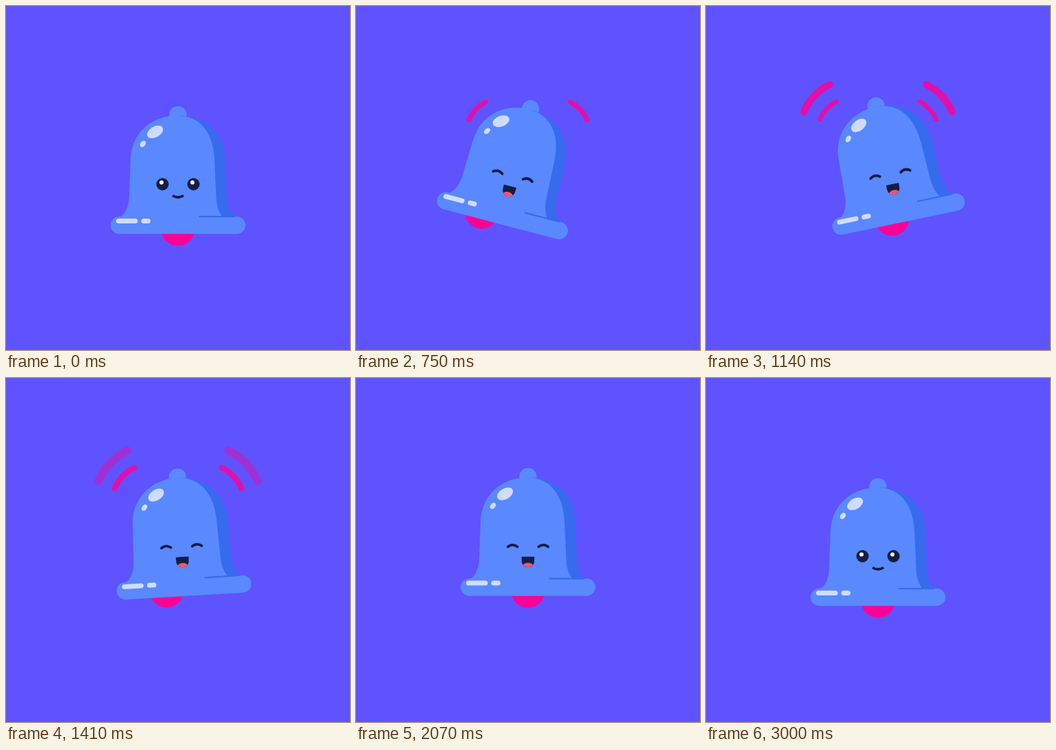
These frames come from a looping animation (500x500 px, 3630 ms). An HTML page:

```html
<!DOCTYPE html>
<html lang="en">
<head>
<meta charset="utf-8">
<title>Ringing bell</title>
<style>
  html, body { margin: 0; width: 100%; height: 100%; overflow: hidden; background: #5f52ff; }
  svg { display: block; width: 100%; height: 100%; }
  .bell { fill: #5a88ff; }
  .shade { fill: #376bee; }
  .shine { fill: #d0dcff; }
  .ink { fill: #141d45; }
  .line { fill: none; stroke: #141d45; stroke-width: 3.8; }
  .pink { fill: #ff0096; }
  .wave { fill: none; stroke: #ff0096; stroke-width: 11.3; stroke-linecap: round; }
</style>
</head>
<body>
<svg viewBox="0 0 500 500">
  <defs>
    <clipPath id="lips"><path d="M240.6 274H259.4L259 282Q257.5 289.5 250 289.5Q242.5 289.5 241 282Z"/></clipPath>
    <g id="eye">
      <circle class="ink" r="9"/>
      <circle r="3" cx="-1.5" cy="-2.6" fill="#fff"/>
    </g>
    <path id="arc" class="wave" d="M-71.6 -33.5Q-59 -62.7 -30.6 -77"/>
  </defs>

  <g id="waves"></g>

  <g id="bell">
    <circle id="clapper" class="pink" cx="250" cy="324" r="24.5"/>
    <circle class="bell" cx="250" cy="158" r="12.6"/>
    <path class="shade" d="M250 159C288 159 317 184 319 222L321 278C322 290 326 303 336 308H250Z"/>
    <path class="bell" d="M164 308C174 303 178.5 290 179 278L181 222C183 184 212 159 250 159C282 160 301 184 303 222L305.5 278C306 290 309 300 316 308Z"/>
    <rect class="bell" x="152" y="306" width="196" height="25.3" rx="12.6"/>
    <rect class="shade" x="280" y="305" width="53" height="2.2" rx="1.1"/>
    <g id="gloss">
      <ellipse class="shine" rx="12.5" ry="7.8" transform="translate(216.7 183) rotate(-30)"/>
      <ellipse class="shine" rx="5.2" ry="3.5" transform="translate(199 200.5) rotate(-52)"/>
    </g>
    <rect class="shine" x="160" y="309" width="31.5" height="7" rx="3.5"/>
    <rect class="shine" x="196.5" y="309" width="13.5" height="7" rx="3.5"/>

    <g id="open">
      <use href="#eye" x="227.5" y="259"/>
      <use href="#eye" x="272.5" y="259"/>
      <circle class="bell lid" cx="227.5" r="9.5"/>
      <circle class="bell lid" cx="272.5" r="9.5"/>
    </g>
    <path id="shut" class="line" stroke-linecap="round" d="M220.7 259.7Q227.6 254.6 234.5 259.7M265.5 259.7Q272.4 254.6 279.3 259.7"/>

    <path id="smile" class="line"/>
    <g id="laugh">
      <g clip-path="url(#lips)">
        <rect class="ink" x="238" y="272" width="24" height="20"/>
        <ellipse cx="250" cy="288.5" rx="8" ry="5.5" fill="#f0556e"/>
      </g>
    </g>
  </g>
</svg>
<script>
const LOOP = 3630;
const $ = id => document.getElementById(id);
const clamp = x => Math.min(1, Math.max(0, x));
const part = (t, from, to) => clamp((t - from) / (to - from));
const ease = (t, from, to) => (1 - Math.cos(Math.PI * part(t, from, to))) / 2;
const bump = (t, from, to) => Math.sin(Math.PI * part(t, from, to)) ** 2;

// Damped swing with a 300 ms period, in degrees.
const swing = t => 19.4 * ease(t, 570, 720) * (1 - part(t, 570, 1970) ** 1.5)
  * Math.cos(Math.PI * (t - 720) / 150);

// The bell ducks, floats up, then drops and bounces once.
const duck = t => bump(t, 420, 660);
const land = t => bump(t, 2140, 2510);
const float = t => (1 - Math.exp(-Math.max(0, t - 463) / 300)) * (1 - ease(t, 2100, 2300));
const lift = t => 17 * duck(t) + 9.5 * land(t) - 14.6 * float(t);
const squash = t => 0.04 * duck(t) + 0.025 * land(t);

// The clapper swings wider and slightly slower than the bell, then wobbles out.
const wobble = t => 2.3 * Math.sin(Math.PI * Math.max(0, t - 2180) / 165) * (1 - ease(t, 2180, 2960));
const clapper = t => 1.46 * swing(t * 0.975) - swing(t) + wobble(t);

const closed = t => ease(t, 430, 590) - ease(t, 2250, 2480);
const mouth = t => ease(t, 480, 620) - ease(t, 2200, 2370);
const grin = t => 1 - ease(t, 420, 500) + ease(t, 2430, 2580);

// Sound waves, mirrored left and right.
const WAVES = 5, FIRST = 655, GAP = 202.5, LIFE = 395;
const waves = Array.from({ length: WAVES * 2 }, () => {
  const use = document.createElementNS("http://www.w3.org/2000/svg", "use");
  use.setAttribute("href", "#arc");
  return $("waves").appendChild(use);
});
const lids = document.querySelectorAll(".lid");

function set(el, attrs) {
  for (const name in attrs) el.setAttribute(name, attrs[name]);
}
const show = (el, on) => set(el, { visibility: on ? "visible" : "hidden" });

function drawBell(t) {
  const angle = swing(t), k = squash(t);
  set($("bell"), {
    transform: `translate(0 ${lift(t)}) rotate(${angle} 250 172) ` +
      `translate(250 331) scale(${1 + k} ${1 - 1.35 * k}) translate(-250 -331)`
  });
  set($("clapper"), { transform: `rotate(${clapper(t)} 250 172)` });
  set($("gloss"), { transform: `rotate(${-0.36 * angle} 250 222)` });
}

function drawFace(t) {
  const c = closed(t), m = mouth(t), g = grin(t);
  show($("open"), c < 0.85);
  show($("shut"), c >= 0.85);
  lids.forEach(lid => set(lid, { cy: 278 - 15 * c }));
  show($("laugh"), m > 0.2);
  show($("smile"), m <= 0.2);
  set($("laugh"), { transform: `translate(0 277) scale(1 ${m}) translate(0 -277)` });
  set($("smile"), { d: `M242 ${277 - 1.5 * g}Q250 ${277 + 3.5 * g} 258 ${277 - 1.5 * g}` });
}

function drawWaves(t) {
  const y = 191 + lift(t) / 2;
  waves.forEach((wave, i) => {
    const p = (t - FIRST - GAP * (i >> 1)) / LIFE;
    const side = i % 2 ? 1 : -1;
    const size = 0.46 + 0.63 * p;
    const on = p > 0 && p < 1;
    show(wave, on);
    if (on) set(wave, {
      transform: `translate(${250 + side * 42.4} ${y}) scale(${-side * size} ${size})`,
      opacity: 0.82 * clamp(p / 0.12) * clamp((1.09 - size) / 0.14)
    });
  });
}

const start = performance.now();
function frame() {
  const t = (performance.now() - start) % LOOP;
  drawBell(t);
  drawFace(t);
  drawWaves(t);
  requestAnimationFrame(frame);
}
frame();
</script>
</body>
</html>
```
